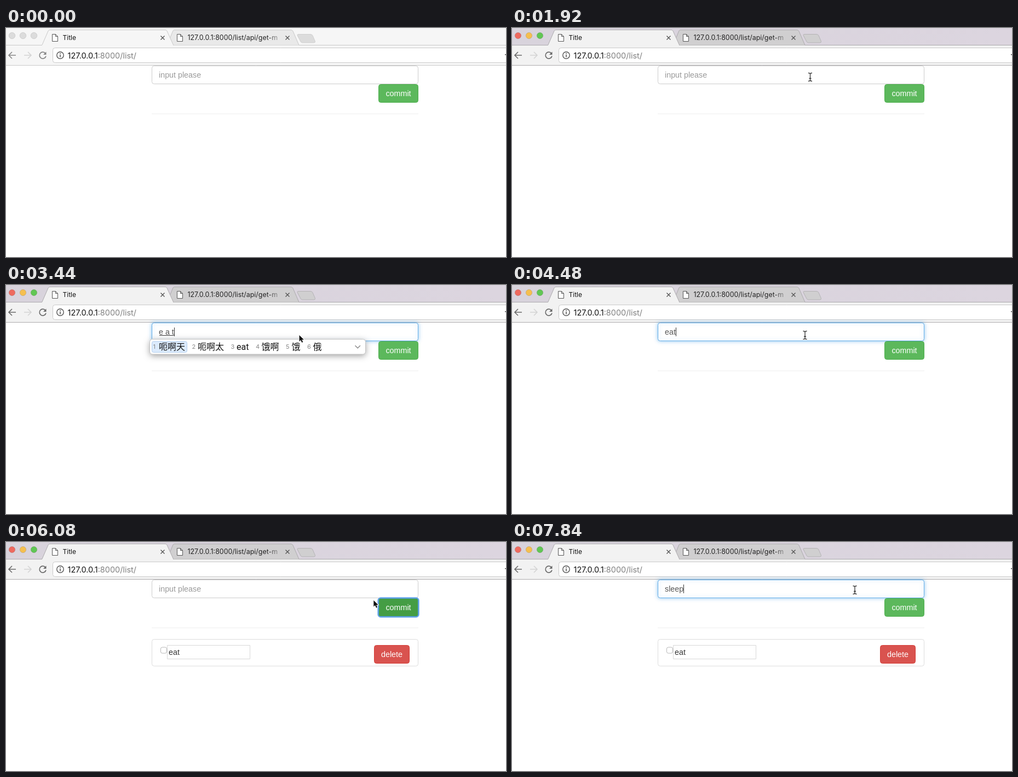
Animation of 913 by 420 pixels, one loop 8 s. Source, as an HTML page with a canvas:

```html
<!DOCTYPE html>
<html lang="en">
<head>
<meta charset="utf-8">
<title>Todo list demo</title>
<style>
html, body { margin: 0; width: 100%; height: 100%; overflow: hidden; background: #fff; }
canvas { display: block; }
</style>
</head>
<body>
<canvas id="stage" width="913" height="420"></canvas>
<script>
const ctx = document.getElementById('stage').getContext('2d');
const LOOP = 8000, STEP = 80;
const UI = 'Inter, Roboto, sans-serif';
const PAGE = '14.3px "Liberation Sans", Arial, sans-serif';
const IME = '16px Roboto, "Noto Sans CJK SC", "Noto Sans CJK", sans-serif';

const ramp = (t, a, b) => Math.min(1, Math.max(0, (t - a) / (b - a)));
const within = (t, spans) => spans.some(([a, b]) => t >= a && t < b);
// Latest value whose start time has passed
const latest = (t, list) => list.filter(e => e[0] <= t).pop()[1];

const typed = [[0, ''], [2960, 'e'], [3200, 'e a'], [3440, 'e a t'], [4400, 'eat'],
  [5840, ''], [6960, 's'], [7200, 'sl'], [7360, 'sle'], [7600, 'slee'], [7840, 'sleep']];
const choices = [[0, '饿 呃 额 鹅 恶 俄'], [3200, '呃啊 饿啊 额啊 饿 俄 额'],
  [3440, '呃啊天 呃啊太 eat 饿啊 饿 俄']];
const caretOn = [[2240, 2720], [2960, 3920], [4400, 4960], [5520, 5760], [6800, LOOP]];
const presses = [[1200, 1360], [2240, 2400], [5760, 5920], [6800, 6960]];
const path = [[80, 700, 400], [160, 685, 380], [320, 640, 200], [480, 640, 200], [1040, 573, 84],
  [1840, 573, 84], [2000, 535, 92], [4880, 535, 92], [5280, 684.5, 115.5], [5520, 687, 114],
  [6000, 687, 114], [6560, 626, 88], [LOOP, 626, 88]];

function shape(d, fill, stroke, width = 1) {
  const p = new Path2D(d);
  if (fill) { ctx.fillStyle = fill; ctx.fill(p); }
  if (stroke) { ctx.strokeStyle = stroke; ctx.lineWidth = width; ctx.stroke(p); }
}

function box(x, y, w, h, r, fill, stroke, width = 1) {
  ctx.beginPath();
  ctx.roundRect(x, y, w, h, r);
  if (fill) { ctx.fillStyle = fill; ctx.fill(); }
  if (stroke) { ctx.strokeStyle = stroke; ctx.lineWidth = width; ctx.stroke(); }
}

function disc(x, y, r, fill, stroke, width = 1) {
  ctx.beginPath();
  ctx.arc(x, y, r, 0, 7);
  if (fill) { ctx.fillStyle = fill; ctx.fill(); }
  if (stroke) { ctx.strokeStyle = stroke; ctx.lineWidth = width; ctx.stroke(); }
}

function text(s, x, y, font, color, align = 'left') {
  ctx.font = font;
  ctx.fillStyle = color;
  ctx.textAlign = align;
  ctx.fillText(s, x, y);
  return ctx.measureText(s).width;
}

function glow(color, blur, dy = 0) {
  ctx.shadowColor = color;
  ctx.shadowBlur = blur;
  ctx.shadowOffsetY = dy;
}

const INACTIVE = { strip: ['#f6f6f6', '#f6f6f6'], bar: '#f6f6f6', tab: '#e9e9e9', line: '#c9c9c9',
  plus: '#dcdcdc', icon: '#868686', lights: ['#dcdcdc', '#dcdcdc', '#dcdcdc'], rim: '#cfcfcf' };
const ACTIVE = { strip: ['#d8d3dc', '#dcd5df'], bar: '#f2f2f2', tab: '#d0cfd0', line: '#adabae',
  plus: '#d0cfd0', icon: '#6a6a6a', lights: ['#ee6a5f', '#f5bf4f', '#61c654'], rim: 'rgba(0,0,0,.12)' };

function tabLabel(x) {
  shape(`M${x + .5} 11.5h6l4 4v9h-10zM${x + 6.5} 11.5v4h4`, '#fff', '#555');
}

function closeMark(x) {
  shape(`M${x - 3.5} 14.5l7 7m0-7l-7 7`, null, '#555', 1.4);
}

function chrome(c) {
  const strip = ctx.createLinearGradient(0, 0, 913, 0);
  strip.addColorStop(0, c.strip[0]);
  strip.addColorStop(1, c.strip[1]);
  ctx.fillStyle = strip;
  ctx.fillRect(0, 0, 913, 32);
  ctx.fillStyle = c.bar;
  ctx.fillRect(0, 32, 913, 36);
  shape('M0 31.5H913M0 68.5H913', null, c.line);
  c.lights.forEach((f, i) => disc(11 + 20 * i, 14, 5.7, f, c.rim));

  shape('M294 31.5L305 5Q306 3.5 308 3.5H520Q523 3.5 524 6L535 31.5', c.tab, c.line);
  shape('M534 11.5H556Q559 11.5 560 14L564.5 24.5Q565 27 562 27H541Q539 27 538 25L532 13.5Q531.5 11.5 534 11.5Z',
    c.plus, c.line, .8);
  tabLabel(312);
  const fade = ctx.createLinearGradient(476, 0, 508, 0);
  fade.addColorStop(0, '#222');
  fade.addColorStop(1, 'rgba(34,34,34,0)');
  text('127.0.0.1:8000/list/api/get-m', 331.5, 22, '12.4px ' + UI, fade);
  closeMark(514);

  shape('M65.5 32L77 5.5Q78 3.5 80 3.5H291Q293 3.5 294 5.5L306 32', c.bar, c.line);
  ctx.fillStyle = c.bar;
  ctx.fillRect(66, 31, 239, 2);
  tabLabel(84);
  text('Title', 103.5, 22, '12px ' + UI, '#111');
  closeMark(286);

  shape('M18 50H5.5M11 44L5 50L11 56', null, c.icon, 1.6);
  shape('M33 50H45.5M40 44L46 50L40 56', null, '#d4d4d4', 1.6);
  shape('M72 46.5A6 6 0 1 0 73 51.5', null, c.icon, 1.7);
  shape('M73.5 43.5V49H68Z', c.icon);
  box(85.5, 36.5, 840, 27, 4, '#fff', '#c9c9c9');
  disc(99, 50, 6.2, null, '#555', 1.4);
  shape('M99 49v4.5M99 46v1.7', null, '#555', 1.6);
  const w = text('127.0.0.1', 112.5, 55.5, '14.5px ' + UI, '#111');
  text(':8000/list/', 112.5 + w, 55.5, '14.5px ' + UI, '#808080');
  ctx.fillStyle = '#555';
  ctx.fillRect(911, 48, 2, 1.5);
}

function button(label, x, y, w, fill, border) {
  box(x + .5, y + .5, w - 1, 33, 4, fill, border);
  text(label, x + w / 2, y + 22, PAGE, '#fff', 'center');
}

function field(t) {
  const focus = ramp(t, 2160, 2400) - ramp(t, 5680, 5920) + ramp(t, 6720, 6960);
  box(266.5, 69.5, 486, 33, 4, '#fff', '#ccc');
  if (focus > 0) {
    ctx.save();
    ctx.globalAlpha = focus;
    glow('rgba(102,175,233,.7)', 7);
    box(266.5, 69.5, 486, 33, 4, '#fff', '#66afe9');
    ctx.restore();
  }
  const value = latest(t, typed);
  const w = text(value || 'input please', 279, 91, PAGE, value ? '#555' : '#999');
  const end = 279 + (value ? w : 0);
  ctx.fillStyle = '#333';
  if (t >= 2960 && t < 4400) ctx.fillRect(280, 92, w - 1, 1);
  if (within(t, caretOn)) ctx.fillRect(Math.round(end), 78, 1, 16);
}

function popup(t) {
  const alpha = ramp(t, 2880, 3040) - ramp(t, 4320, 4480);
  if (alpha <= 0) return;
  ctx.save();
  ctx.globalAlpha = alpha;
  ctx.save();
  glow('rgba(0,0,0,.38)', 12, 3);
  box(262.5, 99.5, 394, 27.5, 5, '#fff');
  ctx.restore();
  box(262.5, 99.5, 394, 27.5, 5, '#fff', '#c4c4c4');
  let x = 268.5;
  latest(t, choices).split(' ').forEach((word, i) => {
    ctx.font = IME;
    const w = ctx.measureText(word).width;
    if (!i) box(266.5, 103.5, w + 16, 20, 3, '#dcebfd', '#b3cfee');
    text(i + 1, x, 117, '11px ' + UI, '#888');
    text(word, x + 10.5, 119, IME, '#111');
    x += w + 23;
  });
  shape('M637.5 111l4.7 4.7 4.7-4.7', null, '#888', 1.4);
  ctx.restore();
}

function row() {
  box(266.5, 178.5, 486, 49, 4, '#fff', '#ddd');
  box(282.5, 193, 11, 11, 3, '#fff', '#b8b8b8');
  box(294.5, 189.5, 151, 25, 0, '#fff', '#d8d8d8');
  text('eat', 297, 207, PAGE, '#333');
  button('delete', 672, 189, 65, '#d9534f', '#d43f3a');
}

function pointerAt(t) {
  const i = path.findIndex(p => p[0] > t);
  const [a, x0, y0] = path[i - 1], [b, x1, y1] = path[i];
  const k = 1 - (1 - ramp(t, a, b)) ** 2;
  return [x0 + (x1 - x0) * k, y0 + (y1 - y0) * k];
}

function pointerKind(t, x, y) {
  if (t < 1280 || (t >= 2960 && t < 4400)) return 'arrow';
  if (x >= 680 && x < 753 && y >= 103 && y < 137) return 'hand';
  return x > 266 && x < 753 && y > 69 && y < 103 ? 'beam' : 'arrow';
}

function pointer(kind, x, y, pressed) {
  ctx.save();
  ctx.translate(x, y);
  ctx.lineJoin = 'round';
  if (pressed) {
    const on = kind === 'beam' ? 0 : 1;
    disc(4 * on, 6 * on, 16.5, 'rgba(255,255,255,.25)', '#111', 1.2);
  }
  if (kind === 'arrow') {
    const d = 'M.5 0V11.5L3.2 9L5.2 13.6L7.2 12.7L5.3 8.3H9Z';
    shape(d, null, '#fff', 2);
    shape(d, '#111');
  } else if (kind === 'beam') {
    const d = 'M-3.5-7.5Q0-7.5 0-5.5Q0-7.5 3.5-7.5M0-6V6M-3.5 7.5Q0 7.5 0 5.5Q0 7.5 3.5 7.5M-2 2.5H2';
    shape(d, null, '#fff', 3);
    shape(d, null, '#333', 1.3);
  } else {
    shape('M-1.5 1.5Q-1.5 0 0 0Q1.3 0 1.7 1.5L3 5.5Q4-.0 5 5Q6.5 4.2 7.3 5.7Q9 5 9.6 6.6Q11 6.2 11 8V10.5Q10.5 13 9.5 15.5H2.5Q1.5 13-.5 11.5L-3.5 8.5Q-4 6.8-2.3 6.8L.2 8.5Z',
      '#fff', '#222', 1.1);
    shape('M3.8 9.5v3.5M6 9.5v3.5M8.2 9.5v3.5', null, '#222', .9);
  }
  ctx.restore();
}

function draw(t) {
  const [x, y] = pointerAt(Math.max(t, 80));
  const kind = pointerKind(t, x, y);
  ctx.fillStyle = '#fff';
  ctx.fillRect(0, 0, 913, 420);
  chrome(INACTIVE);
  const active = ramp(t, 1200, 1360);
  if (active > 0) {
    ctx.globalAlpha = active;
    chrome(ACTIVE);
    ctx.globalAlpha = 1;
  }

  field(t);
  const focused = t >= 5760 && t < 6800;
  const dark = focused || kind === 'hand';
  if (focused) box(679.5, 102.5, 74, 35, 5, null, '#9cc6f2', 3);
  button('commit', 680, 103, 73, dark ? '#449d44' : '#5cb85c', dark ? '#398439' : '#4cae4c');
  if (focused) box(680, 103, 73, 34, 4, null, '#5b9fe3', 2);
  ctx.fillStyle = '#eee';
  ctx.fillRect(266, 157, 487, 1);
  if (t >= 5840) row();
  popup(t);
  if (t >= 160) pointer(kind, x, y, within(t, presses));
}

function tick(now) {
  const t = now % LOOP;
  draw(t - t % STEP);
  requestAnimationFrame(tick);
}
requestAnimationFrame(tick);
</script>
</body>
</html>
```
